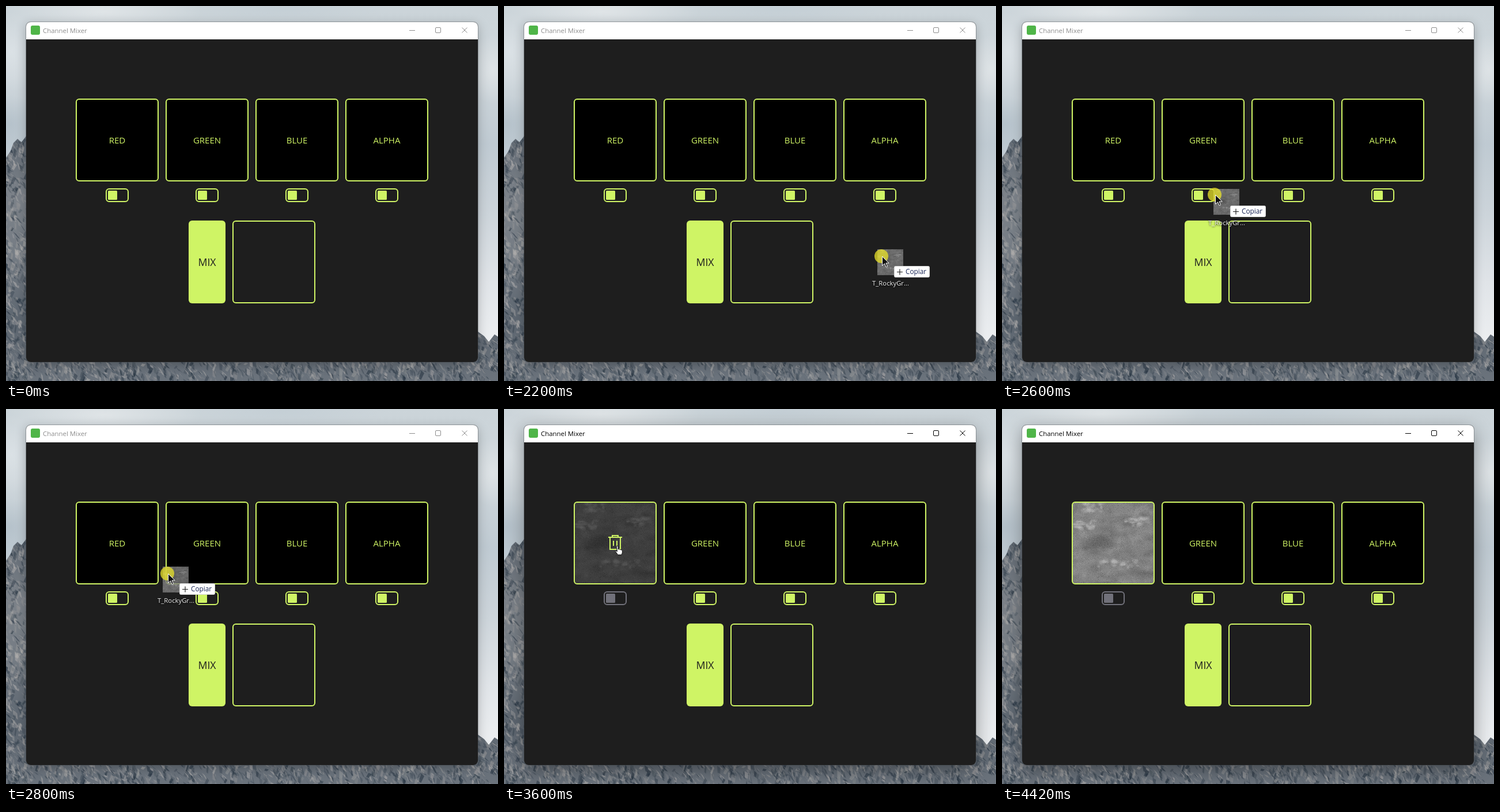
An HTML page with a canvas for the animation above (5820 ms loop, 854 px wide and 652 px high).

```html
<!DOCTYPE html>
<html lang="en">
<head>
<meta charset="utf-8">
<title>Channel Mixer</title>
<style>
html, body { margin: 0; width: 100%; height: 100%; overflow: hidden; }
canvas { display: block; }
</style>
</head>
<body>
<canvas id="stage" width="854" height="652"></canvas>
<script>
const LOOP = 5820, LIME = '#cff465', GRAY = '#71717a', DARK = '#1e1e1e';
const FONT = '"Open Sans", "Noto Sans", sans-serif';
const ctx = document.getElementById('stage').getContext('2d');

// Pointer poses: start time, kind, x, y, and where the dragged thumbnail hangs
const poses = [
  [0, ''],
  [1800, 'blocked', 848, 488],
  [2000, 'drag', 770, 466, -5, -11],
  [2200, 'drag', 655, 435, -7, -12],
  [2400, 'drag', 510, 378, -4, -11],
  [2600, 'drag', 369, 328, -2, -10],
  [2800, 'drag', 280, 286, -8, -12],
  [3000, 'drag', 215, 250, -13, -14],
  [3200, 'drag', 194, 238, -17, -16],
  [3600, 'hand', 197, 238],
  [3800, 'hand', 204, 243],
  [4000, 'arrow', 385, 318],
  [4200, 'arrow', 680, 425],
  [4420, '']
];

function seeded(s) {
  return () => (s = s * 16807 % 2147483647) / 2147483647;
}

function layer(w, h, draw) {
  const c = document.createElement('canvas');
  c.width = w;
  c.height = h;
  draw(c.getContext('2d'));
  return c;
}

function blob(g, x, y, rx, ry, rgb, alpha) {
  g.save();
  g.translate(x, y);
  g.scale(rx, ry);
  const fill = g.createRadialGradient(0, 0, 0, 0, 0, 1);
  fill.addColorStop(0, `rgba(${rgb},${alpha})`);
  fill.addColorStop(1, `rgba(${rgb},0)`);
  g.fillStyle = fill;
  g.fillRect(-1, -1, 2, 2);
  g.restore();
}

function outline(g, points) {
  g.beginPath();
  points.forEach(p => g.lineTo(...p));
  g.closePath();
}

function fade(g, y0, y1, colors) {
  const fill = g.createLinearGradient(0, y0, 0, y1);
  colors.forEach((c, i) => fill.addColorStop(i / (colors.length - 1), c));
  g.fillStyle = fill;
  g.fillRect(0, y0, 854, 652 - y0);
}

const backdrop = layer(854, 652, g => {
  fade(g, 0, 600, ['#cbd4d9', '#ced6db', '#bfcad2', '#ccd4da', '#e0e4e8', '#eef0f2']);
  blob(g, 170, 10, 170, 45, '228,232,234', .8);
  blob(g, 480, 5, 180, 30, '190,202,210', .5);
  blob(g, 845, 110, 45, 60, '228,232,234', .7);
  blob(g, 10, 80, 45, 70, '222,228,232', .8);
  blob(g, 5, 205, 60, 50, '172,186,196', .6);

  g.save();
  outline(g, [[0, 264], [8, 252], [13, 238], [20, 231], [27, 237], [35, 226], [60, 240],
    [300, 590], [780, 590], [819, 566], [830, 574], [838, 584], [848, 571],
    [854, 575], [854, 652], [0, 652]]);
  g.clip();
  fade(g, 220, 652, ['#5f6872', '#7c8289', '#757c84', '#5d6670', '#6b737c']);

  const rnd = seeded(41), tones = ['#22303e', '#3c4854', '#959698', '#b2b0af'];
  const facet = (x, y, w, h, slant) => {
    g.globalAlpha = .25 + rnd() * .35;
    outline(g, [[x, y], [x + w, y + h * .3], [x + w * .6 + slant, y + h], [x + slant - 1, y + h * .8]]);
    g.fillStyle = tones[rnd() * 4 | 0];
    g.fill();
  };
  const cliff = (n, x, y, w, h) => {
    for (let i = 0; i < n; i++)
      facet(x + rnd() * w, y + rnd() * h, 1.5 + rnd() * 5, 4 + rnd() * 13, rnd() * 14 - 4);
  };
  cliff(450, -8, 228, 43, 420);
  cliff(850, 0, 610, 854, 40);
  cliff(70, 814, 566, 40, 60);
  g.restore();
});

const texture = layer(144, 144, g => {
  const rnd = seeded(77);
  g.fillStyle = '#818181';
  g.fillRect(0, 0, 144, 144);
  for (let i = 0; i < 160; i++)
    blob(g, rnd() * 144, rnd() * 144, 5 + rnd() * 15, 4 + rnd() * 10,
      i % 2 ? '165,165,165' : '85,85,85', .25);
  blob(g, 44, 72, 34, 22, '65,65,65', .5);
  // Ragged pale patches
  [[22, 40, 18], [112, 35, 20], [80, 108, 36], [36, 10, 16]].forEach(([x, y, r]) => {
    for (let i = 0; i < 26; i++)
      blob(g, x + (rnd() * 2 - 1) * r, y + (rnd() * 2 - 1) * 7, 3 + rnd() * 6, 2 + rnd() * 4, '190,190,190', .45);
  });
  for (let i = 0; i < 5000; i++) {
    g.fillStyle = i % 2 ? 'rgba(255,255,255,.1)' : 'rgba(0,0,0,.1)';
    g.fillRect(rnd() * 144 | 0, rnd() * 144 | 0, 1, 1);
  }
});

function round(x, y, w, h, r, fill, stroke, width = 2) {
  ctx.beginPath();
  ctx.roundRect(x, y, w, h, r);
  if (fill) { ctx.fillStyle = fill; ctx.fill(); }
  if (stroke) { ctx.strokeStyle = stroke; ctx.lineWidth = width; ctx.stroke(); }
}

function text(s, x, y, size, color, align = 'center') {
  ctx.font = `${size}px ${FONT}`;
  ctx.textAlign = align;
  ctx.fillStyle = color;
  ctx.fillText(s, x, y);
}

function line(d, color, width = 2, fill) {
  const path = new Path2D(d);
  if (fill) { ctx.fillStyle = fill; ctx.fill(path); }
  ctx.strokeStyle = color;
  ctx.lineWidth = width;
  ctx.stroke(path);
}

function at(x, y, draw) {
  ctx.save();
  ctx.translate(x, y);
  draw();
  ctx.restore();
}

function frameWindow(active) {
  ctx.save();
  ctx.shadowColor = active ? 'rgba(0,0,0,.36)' : 'rgba(0,0,0,.25)';
  ctx.shadowBlur = active ? 32 : 18;
  ctx.shadowOffsetY = active ? 8 : 4;
  round(35, 28, 784, 591, 8, DARK);
  ctx.restore();
  round(34.5, 27.5, 785, 592, 8, null, 'rgba(70,75,80,.4)', 1);
  round(35, 28, 784, 30, [8, 8, 0, 0], '#fff');
  round(43, 34, 16, 16, 3, '#4fb548');
  const ink = active ? '#000' : '#8d8d8d';
  text('Channel Mixer', 64, 47, 11.4, ink, 'left');
  line('M700 42.5h10M791.5 37.5l9 9m0-9l-9 9', ink, 1);
  round(745.5, 37.5, 9, 9, 1.5, null, ink, 1);
}

function trash() {
  line('M181 223h24M188 222v-2h10v2M184 223v21h18v-21M190 229v9M196 229v9', LIME);
}

function channel(label, x, mode) {
  const filled = mode === 'filled' || mode === 'hover';
  round(x + 1, 162, 142, 142, 5, '#000');
  if (filled) {
    ctx.save();
    ctx.clip();
    ctx.drawImage(texture, x, 161);
    if (mode === 'hover') {
      ctx.fillStyle = 'rgba(0,0,0,.52)';
      ctx.fillRect(x, 161, 144, 144);
    }
    ctx.restore();
    if (mode === 'hover') trash();
  } else if (mode === 'over') {
    line('M183 245v-24h14l6 6v18z', '#0bd424');
  } else {
    text(label, x + 72, 239, 15, LIME);
  }
  if (mode === 'over') ctx.setLineDash([6, 4]);
  round(x + 1, 162, 142, 142, 5, null, mode === 'over' ? '#0bd424' : LIME);
  ctx.setLineDash([]);
  const color = filled ? GRAY : LIME;
  round(x + 53, 318, 38, 22, 5, null, color);
  round(x + 56, 321, 16, 16, 1.5, color);
}

function halo(x, y) {
  ctx.beginPath();
  ctx.arc(x, y, 12, 0, 7);
  ctx.fillStyle = 'rgba(232,226,40,.75)';
  ctx.fill();
}

function arrow(x, y) {
  at(x + .5, y + .5, () => line('M0 0v16l4-3.6 2.6 6 2.5-1.1-2.6-5.8h5.3z', '#fff', 1, '#111'));
}

function hand(x, y) {
  at(x, y, () => line('M-2 1q1.5-2 3 0v5q1.5-1 2.5.5 1.5-1 2.5.5 2-.7 2.3 1.3v4l-1.6 3.2h-6l-4.2-5.8q.5-2 3 0z',
    '#111', 1, '#fff'));
}

function dragged(x, y) {
  ctx.globalAlpha = .78;
  ctx.drawImage(texture, x, y, 45, 45);
  ctx.globalAlpha = 1;
  ctx.save();
  ctx.shadowColor = '#000';
  ctx.shadowBlur = 3;
  ctx.shadowOffsetY = 1;
  text('T_RockyGr...', x + 23, y + 63, 11.3, '#eee');
  ctx.restore();
}

function copyTag(x, y) {
  round(x + .5, y + .5, 61, 19, 2, '#fff', '#d5d5d5', 1);
  line(`M${x + 5} ${y + 10.5}h10M${x + 10} ${y + 5.5}v10`, '#222', 1.2);
  text('Copiar', x + 20, y + 14, 11.8, '#1c2858', 'left');
}

function pointer([, kind, x, y, dx, dy]) {
  if (kind === 'blocked') {
    halo(x, y);
    ctx.beginPath();
    ctx.arc(x - 1, y + 1, 6.5, 0, 7);
    ctx.moveTo(x - 5.5, y - 3.5);
    ctx.lineTo(x + 3.5, y + 5.5);
    ctx.strokeStyle = '#5f5b13';
    ctx.lineWidth = 2;
    ctx.stroke();
  } else if (kind === 'drag') {
    dragged(x + dx, y + dy);
    halo(x, y);
    copyTag(x + dx + 29, y + dy + 29);
    arrow(x + 1, y);
  } else if (kind === 'hand') {
    hand(x, y);
  } else if (kind === 'arrow') {
    arrow(x, y);
  }
}

function draw(now) {
  const t = now % LOOP;
  const pose = poses.findLast(p => p[0] <= t);
  const dropped = t >= 3600;
  const mode = dropped ? (pose[1] === 'hand' ? 'hover' : 'filled') : t >= 3000 ? 'over' : '';
  ctx.drawImage(backdrop, 0, 0);
  frameWindow(dropped);
  ['RED', 'GREEN', 'BLUE', 'ALPHA'].forEach((name, i) => channel(name, 121 + 156 * i, i ? '' : mode));
  round(317, 373, 64, 144, 6, LIME);
  text('MIX', 349, 452, 17.7, DARK);
  round(394, 374, 142, 142, 5, null, LIME);
  pointer(pose);
  requestAnimationFrame(draw);
}
requestAnimationFrame(draw);
</script>
</body>
</html>
```
